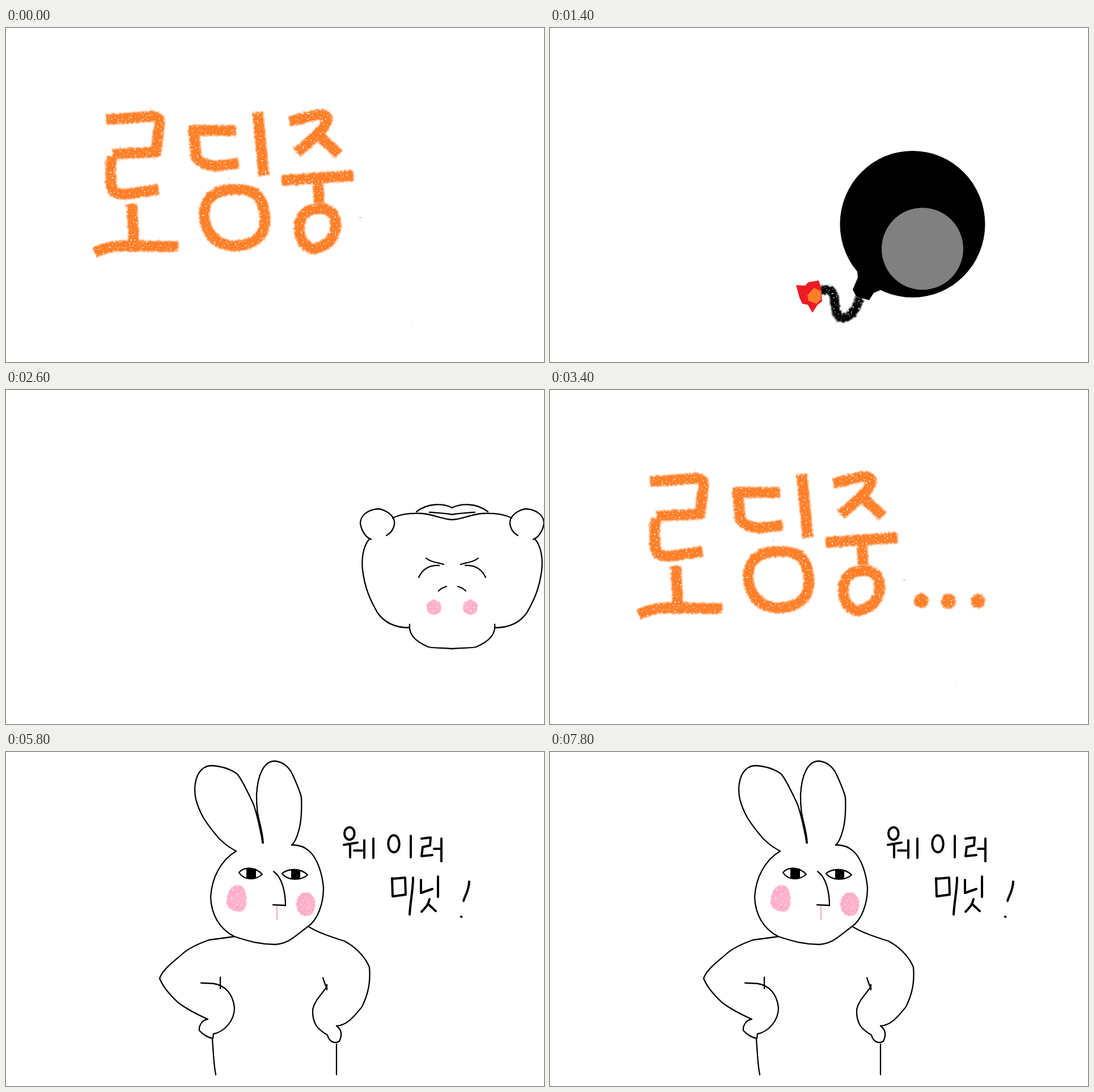
Animation, 949 px wide and 590 px high, one loop 8000 ms. Source, as an HTML page:

```html
<!DOCTYPE html>
<html lang="ko">
<head>
<meta charset="utf-8">
<title>로딩중</title>
<style>
html, body { margin: 0; width: 100%; height: 100%; overflow: hidden; background: #fff; }
svg { display: block; width: 100%; height: 100%; }

.line { fill: none; stroke: #000; stroke-width: 2.3; stroke-linejoin: round; stroke-linecap: round; }
.pen { stroke-width: 4; }
.pupil { fill: #000; stroke: none; }
.blush { fill: #ffaec9; stroke: none; filter: url(#crayon); }
.mouth { stroke: #ffaec9; }
.chalk { fill: none; stroke: #ff7f27; stroke-width: 19; stroke-linejoin: round; filter: url(#chalk); }
.fuse { stroke: #000; stroke-width: 16; }
.dot { fill: #ff7f27; stroke: none; }
.speck { fill: none; stroke: #999; stroke-width: 1; }

/* Every change is a hard cut; the small lead keeps cuts on the safe side of rounding. */
.act { animation: 8s step-end -2ms infinite; }
.loading { animation-name: loading; }
.d1 { animation-name: dot1; }
.d2 { animation-name: dot2; }
.d3 { animation-name: dot3; }
.bomb { animation-name: roll; transform-origin: 240px 347px; }
.bear { animation-name: slide; }
.chaser { animation-name: chase; }
.carrot { animation-name: flee; }
.waiter { animation-name: wait; }
.turn { animation-name: turn; transform-origin: 492.5px 0; }
.say { animation-name: say; }
.w1 { animation-name: word1; }
.w2 { animation-name: word2; }
.w3 { animation-name: word3; }
.w4 { animation-name: word4; }

@keyframes loading { 0%, 35% { opacity: 1 } 10%, 45%, 100% { opacity: 0 } }
@keyframes dot1 { 0%, 10%, 45%, 100% { opacity: 0 } 2.5%, 37.5% { opacity: 1 } }
@keyframes dot2 { 0%, 10%, 45%, 100% { opacity: 0 } 5%, 40% { opacity: 1 } }
@keyframes dot3 { 0%, 10%, 45%, 100% { opacity: 0 } 7.5%, 42.5% { opacity: 1 } }
@keyframes roll {
  0%, 22.5%, 100% { opacity: 0; translate: 0 0; rotate: 0deg }
  10% { opacity: 1; translate: -200px 0; rotate: -90deg }
  12.5% { opacity: 1; translate: 0 0; rotate: 0deg }
  15% { opacity: 1; translate: 200px -9px; rotate: 90deg }
  17.5% { opacity: 1; translate: 400px 0; rotate: 180deg }
  20% { opacity: 1; translate: 600px 0; rotate: 270deg }
}
@keyframes slide {
  0%, 35%, 100% { opacity: 0; translate: 0 0 }
  22.5% { opacity: 1; translate: 0 0 }
  25% { opacity: 1; translate: 200px 0 }
  27.5% { opacity: 1; translate: 400px 0 }
  30% { opacity: 1; translate: 600px 0 }
  32.5% { opacity: 1; translate: 802px 0 }
}
@keyframes chase {
  0%, 62.5%, 100% { opacity: 0; translate: 0 0 }
  45% { opacity: 1; translate: 83px 0 }
  55% { opacity: 1; translate: 0 0 }
  57.5% { opacity: 1; translate: -84px 0 }
  60% { opacity: 1; translate: -169px 0 }
}
@keyframes flee {
  0%, 60%, 100% { opacity: 0; translate: 0 0 }
  45% { opacity: 1; translate: 84px 0 }
  55% { opacity: 1; translate: 0 0 }
  57.5% { opacity: 1; translate: -151px -211px }
}
@keyframes wait { 0% { opacity: 0 } 62.5%, 100% { opacity: 1 } }
@keyframes turn { 0%, 85%, 97.5%, 100% { transform: none } 78.75%, 91.25% { transform: scaleX(-1) } }
@keyframes say { 0%, 85%, 97.5%, 100% { translate: 0 0 } 78.75%, 91.25% { translate: -429px 0 } }
@keyframes word1 { 0% { opacity: 0 } 65%, 100% { opacity: 1 } }
@keyframes word2 { 0% { opacity: 0 } 67.5%, 100% { opacity: 1 } }
@keyframes word3 { 0% { opacity: 0 } 70%, 100% { opacity: 1 } }
@keyframes word4 { 0% { opacity: 0 } 72.5%, 100% { opacity: 1 } }
</style>
</head>
<body>
<svg viewBox="0 0 949 590" preserveAspectRatio="none">
  <defs>
    <filter id="chalk" filterUnits="userSpaceOnUse" x="0" y="0" width="949" height="590" color-interpolation-filters="sRGB">
      <feTurbulence type="fractalNoise" baseFrequency=".3" numOctaves="2" seed="4" result="noise"/>
      <feColorMatrix in="noise" values="0 0 0 0 0  0 0 0 0 0  0 0 0 0 0  6 0 0 0 -1.2" result="grain"/>
      <feDisplacementMap in="SourceGraphic" in2="noise" scale="8" xChannelSelector="R" yChannelSelector="G"/>
      <feGaussianBlur stdDeviation="1"/>
      <feComposite in2="grain" operator="in"/>
    </filter>
    <filter id="crayon" x="-20%" y="-20%" width="140%" height="140%" color-interpolation-filters="sRGB">
      <feTurbulence type="fractalNoise" baseFrequency=".35" numOctaves="2" seed="9" result="noise"/>
      <feColorMatrix in="noise" values="0 0 0 0 0  0 0 0 0 0  0 0 0 0 0  6 0 0 0 -1.3" result="grain"/>
      <feDisplacementMap in="SourceGraphic" in2="noise" scale="6" xChannelSelector="R" yChannelSelector="G"/>
      <feComposite in2="grain" operator="in"/>
    </filter>
  </defs>

  <g class="act loading" role="img" aria-label="로딩중...">
    <g class="chalk">
      <path d="M177 162L260 156Q274 157 270 175L265 219L188 223M187 227C184 250 182 275 190 289Q200 296 222 292L269 285M222 311L226 380M156 396C175 388 195 384 220 385L304 386"/>
      <path d="M321 181H406M332 184L335 225Q338 240 370 244L410 239M444 149L455 261M390 286C430 283 445 290 452 310C460 335 458 350 450 365C435 383 415 386 395 384C370 382 352 360 350 335C348 310 360 290 390 286Z"/>
      <path d="M500 165L550 153Q570 152 566 165C555 188 530 205 513 220M552 190L587 223M486 269L613 261M551 274L552 309M545 320C570 315 583 330 582 350C580 375 562 388 541 390C522 385 516 365 518 345C522 328 530 322 545 320Z"/>
      <g class="dot">
        <circle class="act d1" cx="655" cy="372" r="13"/>
        <circle class="act d2" cx="703" cy="373" r="13"/>
        <circle class="act d3" cx="755" cy="373" r="12.5"/>
      </g>
    </g>
    <path class="speck" d="M254 141h2M393 266h2M623 335h4M717 522h1"/>
  </g>

  <g class="act bomb">
    <ellipse cx="240.5" cy="347.5" rx="128" ry="129.5"/>
    <path d="M290 234L309 226L317 213L340 220L346 232L337 253L338 266L310 270Z"/>
    <ellipse cx="223" cy="304" rx="72" ry="72.5" fill="#808080"/>
    <path class="chalk fuse" d="M334 218C338 200 348 184 362 182C378 180 376 205 380 222C383 234 392 232 403 230"/>
    <path fill="#ed1c24" d="M402 236L400 211L408 205L417 191L425 205L435 207L440 218L446 240L430 239L424 245L406 248Z"/>
    <path fill="#ff7f27" d="M402 214L410 207L424 212L426 222L414 235L402 229Z"/>
  </g>

  <g class="act bear line">
    <g id="half">
      <path d="M-15 229C0 229 20 219 40 218C60 217 78 220 90 226M101 257C88 250 84 235 89 226C95 216 108 210 117 210C135 212 147 222 147 236C145 248 138 260 128 264M130 262C143 276 145 300 143 318C139 350 130 370 117 393C104 412 85 420 60 420"/>
      <path d="M60 414C62 432 50 444 27 454C18 456 8 455 -15 457M-15 208C0 200 28 199 48 215M-15 220C0 217 12 217 25 216"/>
      <path d="M0 308C15 304 24 303 31 297M8 310C28 309 38 318 44 331M-5 347Q3 349 9 355"/>
      <circle class="blush" cx="17" cy="384" r="13"/>
    </g>
    <use href="#half" transform="translate(-30) scale(-1 1)"/>
  </g>

  <g class="act chaser line">
    <path d="M550 242C540 225 531 190 534 163C540 130 555 104 575 103C592 105 602 125 603 155C604 190 594 215 593 238"/>
    <path d="M594 236C597 210 602 185 612 160C620 145 625 130 640 121C655 113 672 108 686 114C698 125 700 150 692 178C684 200 668 218 660 229C650 240 643 246 634 250"/>
    <path d="M550 240C520 244 508 265 501 300C498 340 510 370 535 387C548 400 565 402 580 402C605 402 630 392 645 384C665 370 673 345 672 320C670 290 658 262 634 250"/>
    <path d="M603 190C598 210 594 222 594 237" stroke-width="3.5"/>
    <path d="M525 289C535 281 555 277 564 288C555 298 535 299 525 289M594 289C605 277 620 275 631 286C622 297 605 298 594 289M577 284C563 295 560 320 559 339L578 337"/>
    <path class="pupil" d="M534 281h13v15h-13zM602 279h14v15h-14z"/>
    <path class="mouth" d="M571 341V361"/>
    <ellipse class="blush" cx="527" cy="336" rx="15" ry="19"/>
    <ellipse class="blush" cx="634" cy="327" rx="15.5" ry="21"/>
    <path d="M530 380L512 380C490 378 465 370 440 363C415 357 390 350 380 345C370 338 362 330 355 328C350 332 358 340 364 348C350 347 338 347 327 347C320 352 319 360 319 369C325 380 338 386 355 387C380 386 400 390 420 398C450 408 480 407 519 425C523 460 526 500 528 547"/>
    <path d="M645 384C660 390 668 405 698 457C712 490 718 515 725 548"/>
  </g>

  <g class="act carrot">
    <path fill="#ff7f27" d="M181 281L190 264C200 261 206 262 212 267C222 280 228 290 230 304C230 325 236 340 235 359C225 355 215 340 203 323C190 305 180 292 181 281Z"/>
    <path fill="#22b14c" stroke="#22b14c" stroke-width="2" stroke-linejoin="round" d="M153 213L160 211L163 225L170 233L171 222L175 226L175 240L181 248L182 239L190 240L190 260L180 264L165 264L166 257L174 256L163 243L150 230L152 227L159 230Z"/>
    <path fill="none" stroke="#fff" d="M156 216L159 224M155 231L163 239M168 260L175 260M185 244L186 255"/>
  </g>

  <g class="act waiter line">
    <g class="act turn">
      <path d="M406 175C396 170 384 161 376 153C364 139 354 127 346 112C337 94 333 82 333 65C334 42 343 25 362 24C380 25 396 30 408 39C419 53 428 75 436 91C444 112 449 140 453 161"/>
      <path d="M453 160C449 130 441 110 442 75C444 38 456 16 474 16C488 17 499 26 505 39C512 54 518 68 521 80C522 104 521 124 516 140Q512 156 504 165"/>
      <path d="M406 175C378 192 363 223 361 256C362 288 377 313 403 326C430 335 450 340 475 340C500 338 510 325 533 308C550 296 560 268 560 240C558 214 549 188 535 175C526 167 514 164 504 164"/>
      <path d="M443 108C447 128 452 142 453 160" stroke-width="3.8"/>
      <path d="M411 213C420 202 440 203 452 216C440 227 420 227 411 213M487 215C497 205 520 205 532 217C520 228 497 227 487 215M472 211C488 222 493 250 493 271L471 270"/>
      <path class="pupil" d="M424 206h17v17h-17zM503 209h16v16h-16z"/>
      <path class="mouth" d="M478 273V296"/>
      <path class="blush" d="M407 235C420 234 426 248 424 264C423 276 420 283 409 282C396 281 387 272 389 261C391 248 397 237 407 235Z"/>
      <ellipse class="blush" cx="529" cy="269" rx="17" ry="21"/>
      <path d="M403 326L358 332Q325 344 312 356C296 370 276 384 271 400C276 413 290 430 304 443C320 455 338 464 356 472C345 473 340 485 341 492C348 500 358 505 365 506L366 498C385 494 403 475 403 452C400 425 385 412 366 409L344 408M378 398V418M364 508C366 530 366 550 370 570"/>
      <path d="M533 308C552 320 575 327 597 334C618 345 634 363 641 380C643 405 640 425 628 450C614 467 603 482 583 484C592 490 593 500 588 511C580 516 570 512 567 500C550 490 540 480 541 455C544 440 555 430 565 416L559 399M566 411V420M583 516V570"/>
    </g>
    <g class="act say pen" role="img" aria-label="웨이러 미닛!">
      <path class="act w1" d="M606 133C617 133 618 154 606 155C594 154 594 134 606 133ZM596 164L620 160M607 163V186M614 174H628M632 156V187M648 153V187"/>
      <path class="act w2" d="M684 147C697 148 697 177 684 177C671 176 671 148 684 147ZM714 148V186M733 153L749 151L748 165L735 168L733 184L752 182M755 171H768M768 153V193"/>
      <path class="act w3" d="M681 223L682 255L705 252L704 222L681 224M718 222C718 245 713 265 712 287M732 226V249L752 242M762 220V256M747 260C745 270 740 275 733 282M744 268L758 281"/>
      <path class="act w4" d="M817 229C817 243 810 253 807 263M803 291h.5"/>
    </g>
  </g>
</svg>
</body>
</html>
```
